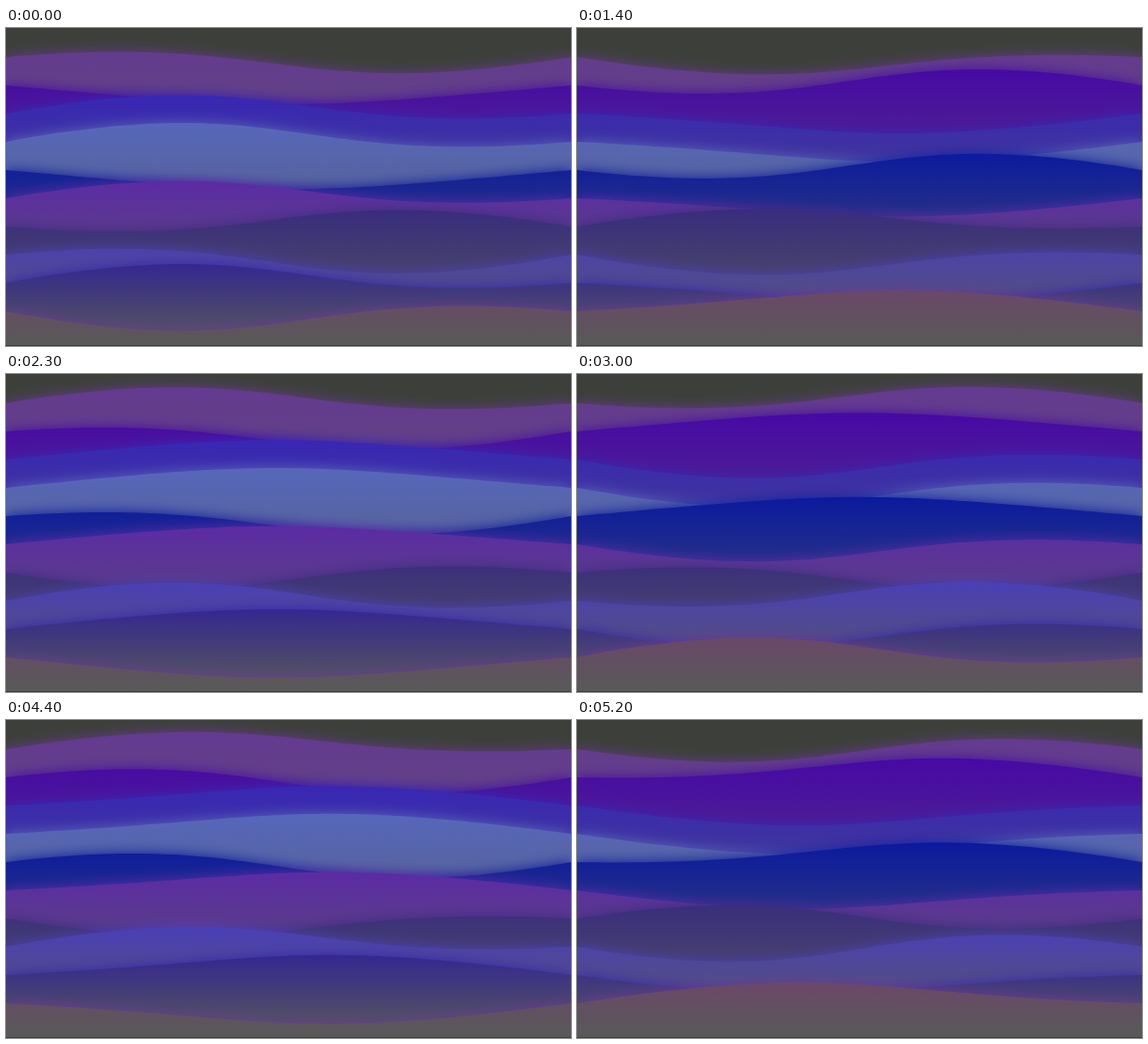
An HTML page with a canvas for the animation above (5.3 s loop, 600x338 px).

```html
<!DOCTYPE html>
<html>
<head>
<meta charset="utf-8">
<style>
  html, body { margin: 0; width: 100%; height: 100%; overflow: hidden; background: #3d3f3a; }
  canvas { display: block; }
</style>
</head>
<body>
<canvas id="stage" width="600" height="338"></canvas>
<script>
const ctx = document.getElementById('stage').getContext('2d');
const W = 600, H = 338, FLOOR = 337;
const LOOP = 5300, STEP = 100, PERIOD = 2000;

// colour, swing of the control points, start phase in degrees, glow
const waves = [
  ['#643a91', 49, -31],
  ['#4709a6', 53, 30],
  ['#3827b4', 55, -92],
  ['#5667ba', 56, -92],
  ['#0b1a9e', 54, 30],
  ['#5c2ba5', 51, -92],
  ['#382c7e', 50, 149],
  ['#4a3fb6', 57, -31],
  ['#35288e', 56, -92, '#3524b0'],
  ['#6a4868', 58, 88, '#6a3a94']
];

function drawWave([color, swing, phase, glow = color], y, turn) {
  const angle = phase * Math.PI / 180 - turn;
  const fill = ctx.createLinearGradient(0, y - 20, 0, H);
  fill.addColorStop(0, color);
  fill.addColorStop(1, '#585a58');
  ctx.fillStyle = fill;
  ctx.shadowColor = glow;
  ctx.beginPath();
  ctx.moveTo(0, y);
  ctx.bezierCurveTo(
    W / 2, y + swing * Math.sin(angle),
    W / 2, y + swing * Math.sin(angle + Math.PI * 2 / 3),
    W, y);
  ctx.lineTo(W, H);
  ctx.lineTo(0, H);
  ctx.fill();
}

function draw() {
  const time = Math.floor(performance.now() % LOOP / STEP) * STEP;
  const turn = time / PERIOD * Math.PI * 2;
  ctx.shadowBlur = 0;
  ctx.fillStyle = '#3d3f3a';
  ctx.fillRect(0, 0, W, H);
  ctx.save();
  ctx.beginPath();
  ctx.rect(0, 0, W, FLOOR);
  ctx.clip();
  ctx.shadowBlur = 14;
  waves.forEach((wave, i) => drawWave(wave, 31 + 30 * i, turn));
  ctx.restore();
  requestAnimationFrame(draw);
}
draw();
</script>
</body>
</html>
```
